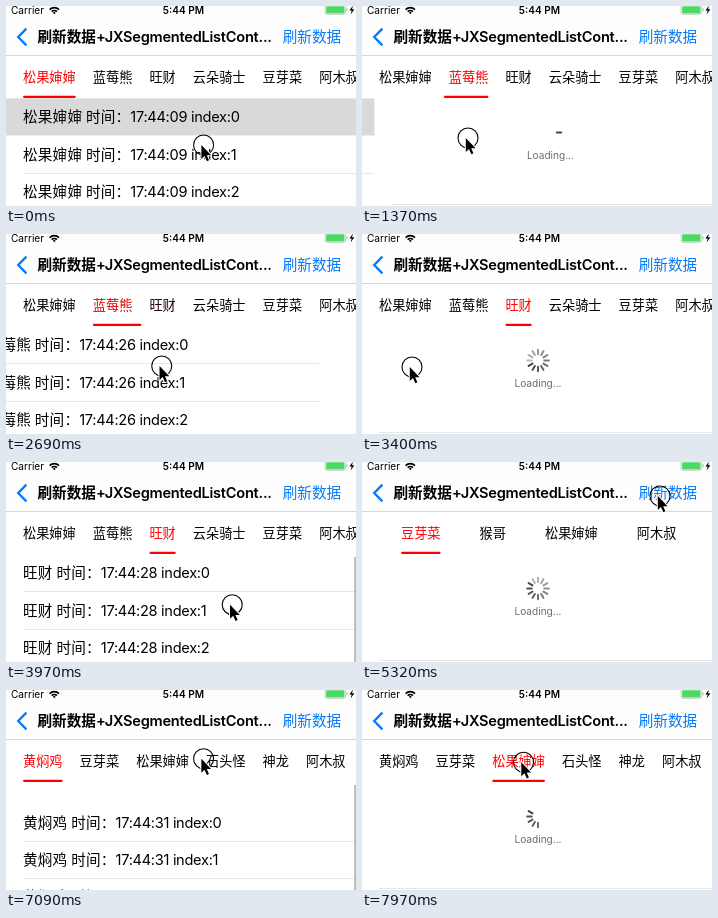
An HTML page with a canvas that plays this animation: 350 by 200 pixels, repeating every 8 s.

```html
<!DOCTYPE html>
<html lang="zh">
<head>
<meta charset="utf-8">
<title>Segmented list</title>
<style>
html, body { margin: 0; width: 100%; height: 100%; overflow: hidden; background: #fff; }
canvas { display: block; width: 350px; height: 200px; }
</style>
</head>
<body>
<canvas id="stage"></canvas>
<script>
const W = 350, H = 200, LOOP = 8000;
const canvas = document.getElementById('stage');
const ctx = canvas.getContext('2d');
const dpr = window.devicePixelRatio || 1;
canvas.width = W * dpr;
canvas.height = H * dpr;

const BLUE = '#007aff', LINE = '#e7e7e9';
const LIST_TOP = 92.2, ROW_H = 37.25, PULL = 68.5, CHAR = 13.2;
const RELOAD_1 = 4500, RELOAD_2 = 6060, TAP = 7600;

const clamp = v => Math.max(0, Math.min(1, v));
const mix = (a, b, p) => a + (b - a) * p;
const easeOut = u => 1 - (1 - u) ** 3;
const swipe = (t, start, length) => 1 - (1 - clamp((t - start) / length) ** 1.5) ** 3;

function tabSet(names, left, gap) {
  let x = left;
  return names.map(name => {
    const tab = { name, x, w: name.length * CHAR };
    x += tab.w + gap;
    return tab;
  });
}

const tabsA = tabSet(['松果婶婶', '蓝莓熊', '旺财', '云朵骑士', '豆芽菜', '阿木叔'], 17, 17);
const tabsB = tabSet(['豆芽菜', '猴哥', '松果婶婶', '阿木叔'], 39, 39);
const tabsC = tabSet(['黄焖鸡', '豆芽菜', '松果婶婶', '石头怪', '神龙', '阿木叔'], 17, 17);

// start: refresh begins, ready: rows arrive, head: first lit spoke of the spinner
const pagesA = [
  { name: '松果婶婶', time: '17:44:09', start: -9000, ready: -8000, head: 0, picked: true },
  { name: '蓝莓熊', time: '17:44:26', start: 1120, ready: 2090, head: 3 },
  { name: '旺财', time: '17:44:28', start: 2700, ready: 3520, head: 3 }
];
const pageB = { name: '豆芽菜', time: '17:44:30', start: RELOAD_1, ready: 5500, head: 4 };
const pageC = { name: '黄焖鸡', time: '17:44:31', start: RELOAD_2, ready: 7010, head: 10 };
const pageD = { name: '松果婶婶', time: '17:44:33', start: TAP, ready: 9000, head: 9 };

const cursorPath = [
  [10, 197.6, 139], [200, 226.4, 137], [520, 226.4, 137], [900, 278.4, 131],
  [1085, 278.4, 131], [1250, 106, 132], [2350, 106, 132], [2560, 192, 132],
  [2642, 192, 132], [2692, 155, 132], [2830, 50, 133], [3560, 50, 133],
  [3970, 226, 143], [4310, 298, 34], [6600, 298, 34], [6790, 255, 62],
  [7280, 161.5, 73], [7440, 161.5, 73], [7460, 161.5, 72.3]
];

function rect(x, y, w, h, color) {
  ctx.fillStyle = color;
  ctx.fillRect(x, y, w, h);
}

function polygon(points) {
  ctx.beginPath();
  points.forEach(([x, y]) => ctx.lineTo(x, y));
  ctx.closePath();
}

// Latin and Chinese runs have their own tracking.
function label(s, x, y, size, { color = '#000', weight = 400, track = 0, cjkTrack = 0 } = {}) {
  ctx.fillStyle = color;
  ctx.font = `${weight} ${size}px Inter, "Noto Sans CJK SC", "Noto Sans CJK", sans-serif`;
  for (const run of s.match(/[\x00-\xff]+|[^\x00-\xff]+/g)) {
    ctx.letterSpacing = (run.charCodeAt(0) < 256 ? track : cjkTrack) + 'px';
    ctx.fillText(run, x, y);
    x += ctx.measureText(run).width;
  }
  ctx.letterSpacing = '0px';
}

function spinner(cx, cy, age, first, scale) {
  const lit = Math.min(12, Math.floor((age - 205) / 33));
  const head = first + Math.floor((age - 250) / 83);
  ctx.save();
  ctx.translate(cx, cy);
  ctx.scale(scale, scale);
  ctx.lineWidth = 2;
  ctx.lineCap = 'round';
  for (let i = 0; i < lit; i++) {
    const a = (head - i) * Math.PI / 6 - Math.PI / 2;
    const shade = Math.round(mix(70, 185, i / 11));
    ctx.strokeStyle = `rgb(${shade},${shade},${shade})`;
    ctx.beginPath();
    ctx.moveTo(6.3 * Math.cos(a), 6.3 * Math.sin(a));
    ctx.lineTo(10.8 * Math.cos(a), 10.8 * Math.sin(a));
    ctx.stroke();
  }
  ctx.restore();
}

function drawPage(page, x, t) {
  if (t < page.start) return;
  const k = clamp((t - page.ready) / 250);
  const top = LIST_TOP + PULL * (1 - easeOut(k));
  ctx.save();
  ctx.translate(x, 0);
  if (k < 1) {
    ctx.globalAlpha = 1 - k;
    spinner(176, 126.5, t - page.start, page.head, 1 - k * 0.6);
    ctx.textAlign = 'center';
    label('Loading...', 176, 152.6, 10.1, { color: '#6c6c6c' });
    ctx.textAlign = 'left';
    ctx.globalAlpha = 1;
  }
  rect(0, top, W, H - top, '#fff');
  for (let i = 0, y = top; y < H; i++, y += ROW_H) {
    if (page.picked && i === 0) rect(0, y, W, ROW_H, '#d9d9d9');
    else rect(17, Math.round(y + ROW_H), W - 17, 1, LINE);
    if (t >= page.ready) {
      const text = `${page.name} 时间：${page.time} index:${i}`;
      label(text, 17, y + 24.2, 14.6, { track: -0.3, cjkTrack: 0.2 });
    }
  }
  const shown = t - page.ready;
  if (shown > 0 && shown < 600) {
    ctx.globalAlpha = clamp((600 - shown) / 140);
    rect(348.2, 95, 1.8, H, '#b8b8b8');
    ctx.globalAlpha = 1;
  }
  ctx.restore();
}

function drawTabs(tabs, pos, slide) {
  const i = Math.min(Math.floor(pos), tabs.length - 2), p = pos - i;
  tabs.forEach((tab, n) => {
    const red = Math.round(255 * clamp(1 - Math.abs(pos - n)));
    label(tab.name, tab.x, 75.9, CHAR, { color: `rgb(${red},0,0)` });
  });
  // The bar first stretches to the next tab, then pulls in its tail.
  const a = tabs[i], b = tabs[i + 1];
  let left = mix(a.x, b.x, clamp(p * 2 - 1));
  let right = mix(a.x + a.w, b.x + b.w, clamp(p * 2));
  if (slide) {
    left = mix(slide.from.x, slide.to.x, slide.p);
    right = left + mix(slide.from.w, slide.to.w, slide.p);
  }
  ctx.fillStyle = '#f00';
  ctx.beginPath();
  ctx.roundRect(left, 89.7, right - left, 2.3, 1.15);
  ctx.fill();
}

function drawStatus() {
  label('Carrier', 5, 7.8, 10.1);
  label('5:44 PM', 156.8, 7.8, 10.1, { weight: 600 });
  ctx.strokeStyle = ctx.fillStyle = '#000';
  ctx.lineWidth = 1.7;
  ctx.lineCap = 'butt';
  for (const r of [3.7, 6.6]) {
    ctx.beginPath();
    ctx.arc(48.3, 8.2, r, -Math.PI * 0.75, -Math.PI * 0.25);
    ctx.stroke();
  }
  ctx.beginPath();
  ctx.moveTo(48.3, 8.2);
  ctx.arc(48.3, 8.2, 2, -Math.PI * 0.75, -Math.PI * 0.25);
  ctx.fill();

  ctx.strokeStyle = '#bbb';
  ctx.lineWidth = 0.7;
  ctx.beginPath();
  ctx.roundRect(319, -0.8, 20.6, 9.2, 2);
  ctx.stroke();
  ctx.fillStyle = '#4cd964';
  ctx.beginPath();
  ctx.roundRect(320.1, 0.2, 18.4, 7.2, 1.2);
  ctx.fill();
  rect(340.4, 2.3, 1.2, 3, '#bbb');
  ctx.fillStyle = '#000';
  polygon([[347, -0.5], [343.4, 4.4], [345.7, 4.4], [344.6, 8.4], [348.4, 3.2], [346, 3.2]]);
  ctx.fill();
}

function buttonAlpha(t) {
  for (const click of [RELOAD_1, RELOAD_2]) {
    if (t > click - 80 && t < click) return 0.3;
    if (t >= click && t < click + 200) return mix(0.3, 1, (t - click) / 200);
  }
  return 1;
}

function drawNav(t) {
  rect(0, 0, W, 49.5, '#fdfdfd');
  rect(0, 49, W, 1, '#d6d6d6');
  drawStatus();
  ctx.strokeStyle = BLUE;
  ctx.lineWidth = 2.3;
  ctx.lineCap = 'butt';
  ctx.beginPath();
  ctx.moveTo(20.4, 22.6);
  ctx.lineTo(12.2, 31);
  ctx.lineTo(20.4, 39.4);
  ctx.stroke();
  label('刷新数据+JXSegmentedListCont...', 31.5, 36.3, 14.6, { weight: 600, track: -0.25 });
  ctx.globalAlpha = buttonAlpha(t);
  label('刷新数据', 276.7, 36.3, 14.6, { color: BLUE });
  ctx.globalAlpha = 1;
}

function cursorAt(t) {
  const next = cursorPath.findIndex(k => k[0] > t);
  if (next === 0) return cursorPath[0].slice(1);
  if (next < 0) return cursorPath[cursorPath.length - 1].slice(1);
  const a = cursorPath[next - 1], b = cursorPath[next];
  const p = (t - a[0]) / (b[0] - a[0]);
  return [mix(a[1], b[1], p), mix(a[2], b[2], p)];
}

function drawCursor(t) {
  const [x, y] = cursorAt(t);
  ctx.save();
  ctx.translate(x, y);
  ctx.strokeStyle = '#000';
  ctx.lineWidth = 1.1;
  ctx.beginPath();
  ctx.arc(0, 0, 10, 0, Math.PI * 2);
  ctx.stroke();
  ctx.translate(-2.2, 0);
  polygon([[0, 0], [0, 14], [3.2, 11], [5.5, 16.2], [7.6, 15.3], [5.4, 10.2], [9.8, 10.2]]);
  ctx.lineJoin = 'round';
  ctx.strokeStyle = '#fff';
  ctx.lineWidth = 2;
  ctx.stroke();
  ctx.fillStyle = '#000';
  ctx.fill();
  ctx.restore();
}

function draw(t) {
  ctx.setTransform(dpr, 0, 0, dpr, 0, 0);
  rect(0, 0, W, H, '#fff');
  let tabs = tabsA, pos = 0, slide = null;
  ctx.save();
  ctx.beginPath();
  ctx.rect(0, LIST_TOP, W, H);
  ctx.clip();
  if (t < RELOAD_1) {
    pos = swipe(t, 1085, 373) + swipe(t, 2642, 450);
    pagesA.forEach((page, i) => {
      const x = (i - pos) * W;
      if (Math.abs(x) < W) drawPage(page, x, t);
    });
  } else if (t < RELOAD_2) {
    tabs = tabsB;
    drawPage(pageB, 0, t);
  } else {
    tabs = tabsC;
    if (t >= TAP) {
      pos = 2;
      slide = { from: tabs[0], to: tabs[2], p: easeOut(clamp((t - TAP) / 250)) };
    }
    drawPage(t < TAP ? pageC : pageD, 0, t);
  }
  ctx.restore();
  drawTabs(tabs, pos, slide);
  drawNav(t);
  drawCursor(t);
}

function tick() {
  draw(performance.now() % LOOP);
  requestAnimationFrame(tick);
}
tick();
</script>
</body>
</html>
```
